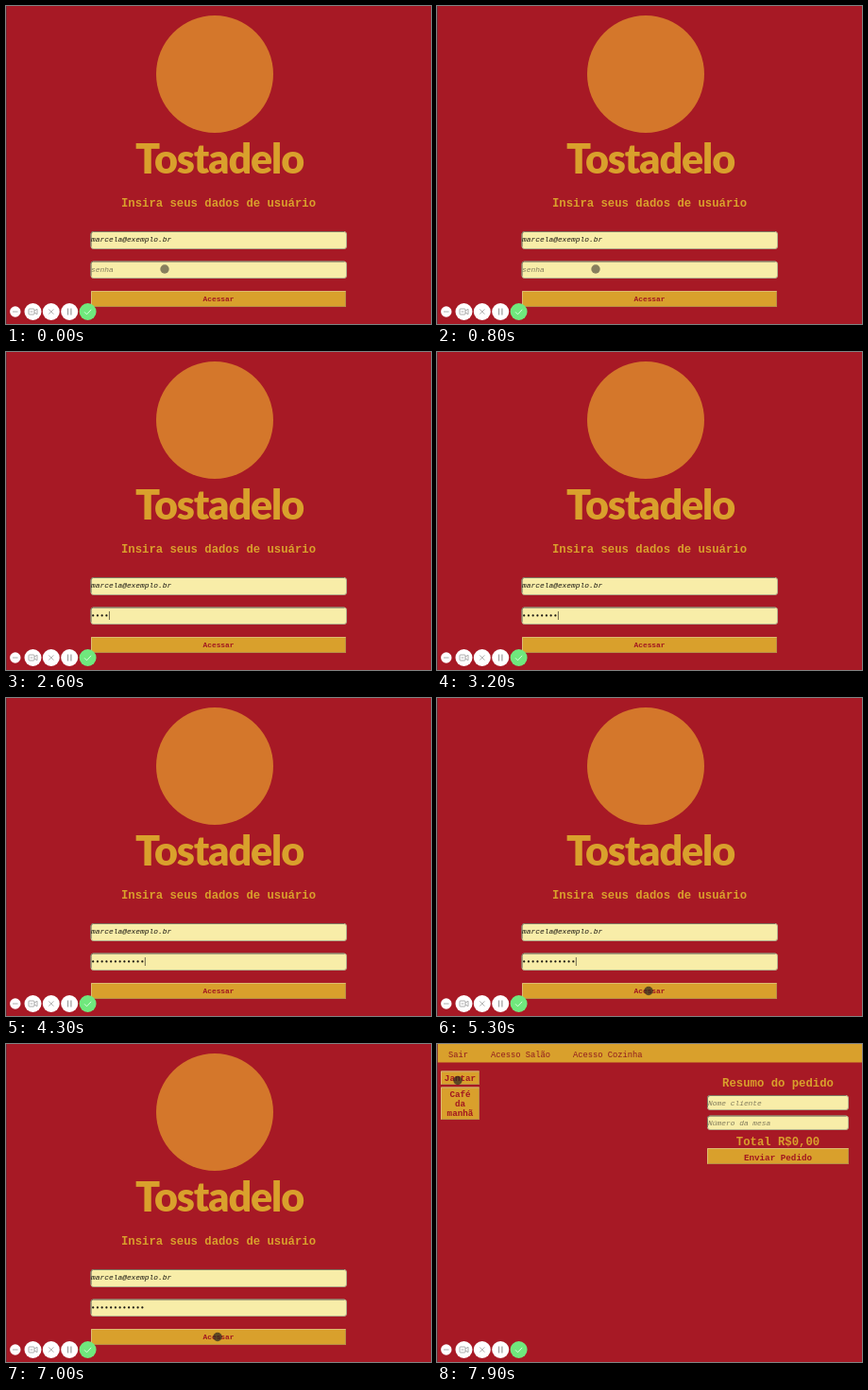
Write an HTML page that moves like this. It is 450x336 px and loops after 8000 ms.

```html
<!DOCTYPE html>
<html lang="pt-BR">
<head>
<meta charset="utf-8">
<title>Pedidos</title>
<style>
  html, body { margin: 0; width: 100%; height: 100%; overflow: hidden; background: #a71925; }
  svg { display: block; width: 100%; height: 100%; }
  text { font-family: "Liberation Mono", "Courier New", monospace; white-space: pre; }
  .bold { font-weight: 700; }
  .mid { text-anchor: middle; }
  .field { font-size: 7.9px; font-style: italic; fill: #17140f; }
  .hint { fill: #827b5c; }
  .gold { fill: #d9a02c; }
  .red { fill: #a11620; }
  .head { font-size: 12.28px; }
  .brand { font-family: Lato, "Open Sans", sans-serif; font-weight: 900; font-size: 43px; letter-spacing: -1.1px; }
  .nav { font-size: 8.75px; fill: #8f1a1f; }
  .btn { font-size: 9.25px; }
  .icon { fill: none; stroke: #a3a3a3; stroke-width: 0.9; }
</style>
</head>
<body>
<svg viewBox="0 0 450 336" preserveAspectRatio="none">
  <rect width="450" height="336" fill="#a71925"/>
  <g id="login">
    <circle cx="221" cy="72" r="62" fill="#d4772b"/>
    <text class="brand gold mid" x="226" y="176.5">Tostadelo</text>
    <text class="head bold gold mid" x="225" y="212">Insira seus dados de usuário</text>
    <g id="loginBoxes"></g>
    <text class="field" x="90" y="249">marcela@exemplo.br</text>
    <text class="field hint" id="hint" x="90" y="280.7">senha</text>
    <g id="dots" fill="#17140f"></g>
    <rect id="caret" y="274" width="0.7" height="9" fill="#3a352a"/>
    <text class="bold red mid" x="225" y="311.5" font-size="7.9">Acessar</text>
  </g>
  <g id="order">
    <rect width="450" height="19.5" class="gold"/>
    <text class="nav" x="12" y="13.7">Sair</text>
    <text class="nav" x="57" y="13.7">Acesso Salão</text>
    <text class="nav" x="144" y="13.7">Acesso Cozinha</text>
    <g id="orderBoxes"></g>
    <text class="btn bold red mid" x="24.5" y="38.7">Jantar</text>
    <text class="btn bold red mid" x="24.5" y="56">Café</text>
    <text class="btn bold red mid" x="24.5" y="66">da</text>
    <text class="btn bold red mid" x="24.5" y="76">manhã</text>
    <text class="head bold gold mid" x="361" y="45">Resumo do pedido</text>
    <text class="field hint" x="287" y="64.5">Nome cliente</text>
    <text class="field hint" x="287" y="86">Número da mesa</text>
    <text class="head bold gold mid" x="361" y="106.5">Total R$0,00</text>
    <text class="btn bold red mid" x="361" y="122.5">Enviar Pedido</text>
  </g>
  <rect width="0.8" height="336" fill="#6d2c37"/>
  <circle id="pointer" r="4.7" fill="#282220"/>
  <g id="toolbar">
    <g fill="#fff">
      <circle cx="9.8" cy="323" r="5.7"/>
      <circle cx="28.5" cy="323" r="9"/>
      <circle cx="47.8" cy="323" r="9"/>
      <circle cx="67.2" cy="323" r="9"/>
      <circle cx="86.6" cy="323" r="9" fill="#70e87d"/>
    </g>
    <g class="icon">
      <path d="M7 323h5.6"/>
      <rect x="24" y="320" width="6" height="6" rx="0.8"/>
      <path d="M30 322l3-1.7v5.4l-3-1.7M25.6 323h2.8"/>
      <path d="M45.2 320.4l5.2 5.2m0-5.2l-5.2 5.2"/>
      <path d="M65.5 319.6v6.8m3.4-6.8v6.8" stroke-width="1.3"/>
      <path d="M83 323.3l2.5 2.5 4.7-5" stroke="#e2ffe6"/>
    </g>
  </g>
</svg>
<script>
const LOOP = 8000;
const $ = id => document.getElementById(id);

function add(parent, tag, attrs) {
  const el = document.createElementNS("http://www.w3.org/2000/svg", tag);
  for (const key in attrs) el.setAttribute(key, attrs[key]);
  parent.append(el);
  return el;
}

// A filled box: one border colour all round, a second one along the top and left.
function box(parent, x, y, w, h, rx, fill, edge, topLeft) {
  const l = x + 0.5, t = y + 0.5, r = x + w - 0.5, b = y + h - 0.5;
  add(parent, "rect", { x: l, y: t, width: r - l, height: b - t, rx, fill, stroke: edge });
  add(parent, "path", {
    d: `M${l} ${b - rx}V${t + rx}q0 ${-rx} ${rx} ${-rx}H${r - rx}`,
    fill: "none", stroke: topLeft
  });
}
const input = (parent, x, y, w, h) => box(parent, x, y, w, h, 2.5, "#f8eda8", "#b3ad8c", "#7d7862");
const button = (parent, x, y, w, h) => box(parent, x, y, w, h, 0, "#d9a02c", "#b98d45", "#deba70");

input($("loginBoxes"), 89.5, 238, 271.5, 19);
input($("loginBoxes"), 89.5, 269.5, 271.5, 18.5);
button($("loginBoxes"), 90, 301, 270, 17);
button($("orderBoxes"), 4, 28.5, 41, 14.5);
button($("orderBoxes"), 4, 45.5, 41, 34.5);
input($("orderBoxes"), 286, 54, 150, 16);
input($("orderBoxes"), 286, 75.5, 150, 15.5);
button($("orderBoxes"), 286, 110, 150, 17);

const PITCH = 4.74;
const keys = Array.from({ length: 12 }, (_, i) => i < 8 ? 2200 + i * 130 : 3600 + (i - 8) * 180);
const dots = keys.map((_, i) => add($("dots"), "circle", { cx: 92.2 + i * PITCH, cy: 278.4, r: 1.1 }));

const FOCUS = 2100, CLICK = 7000, SWITCH = 7300;

// Pointer stops: time, x, y
const stops = [
  [0, 168, 278], [1400, 168, 278], [2000, 169, 281], [4500, 169, 281],
  [5200, 224, 309.5], [7200, 224, 309.5], [7900, 22, 38.5], [LOOP, 22, 38.5]
];

function pointerAt(t) {
  const i = Math.max(1, stops.findIndex(s => s[0] > t));
  const [t0, x0, y0] = stops[i - 1], [t1, x1, y1] = stops[i];
  const p = (t - t0) / (t1 - t0), e = p * p * (3 - 2 * p);
  return [x0 + (x1 - x0) * e, y0 + (y1 - y0) * e];
}

const show = (el, on) => el.setAttribute("visibility", on ? "visible" : "hidden");

function draw(t) {
  const ordering = t >= SWITCH;
  $("login").style.display = ordering ? "none" : "";
  $("order").style.display = ordering ? "" : "none";

  const typed = keys.filter(k => k <= t).length;
  dots.forEach((dot, i) => show(dot, i < typed));
  show($("hint"), typed === 0);

  // The caret blinks from the last key press and stops while the page loads.
  const since = t - (typed ? keys[typed - 1] : FOCUS);
  show($("caret"), t >= FOCUS && t < 6000 && since % 1000 < 500);
  $("caret").setAttribute("x", 90 + typed * PITCH);

  const [x, y] = pointerAt(t);
  const pointer = $("pointer");
  pointer.setAttribute("cx", x);
  pointer.setAttribute("cy", y);
  pointer.setAttribute("fill-opacity", t >= 5200 && t <= CLICK + 200 || t >= 7850 ? 0.7 : 0.54);
  show(pointer, t < FOCUS || t >= 4500);
}

function tick(now) {
  draw(now % LOOP);
  requestAnimationFrame(tick);
}
draw(0);
requestAnimationFrame(tick);
</script>
</body>
</html>
```
